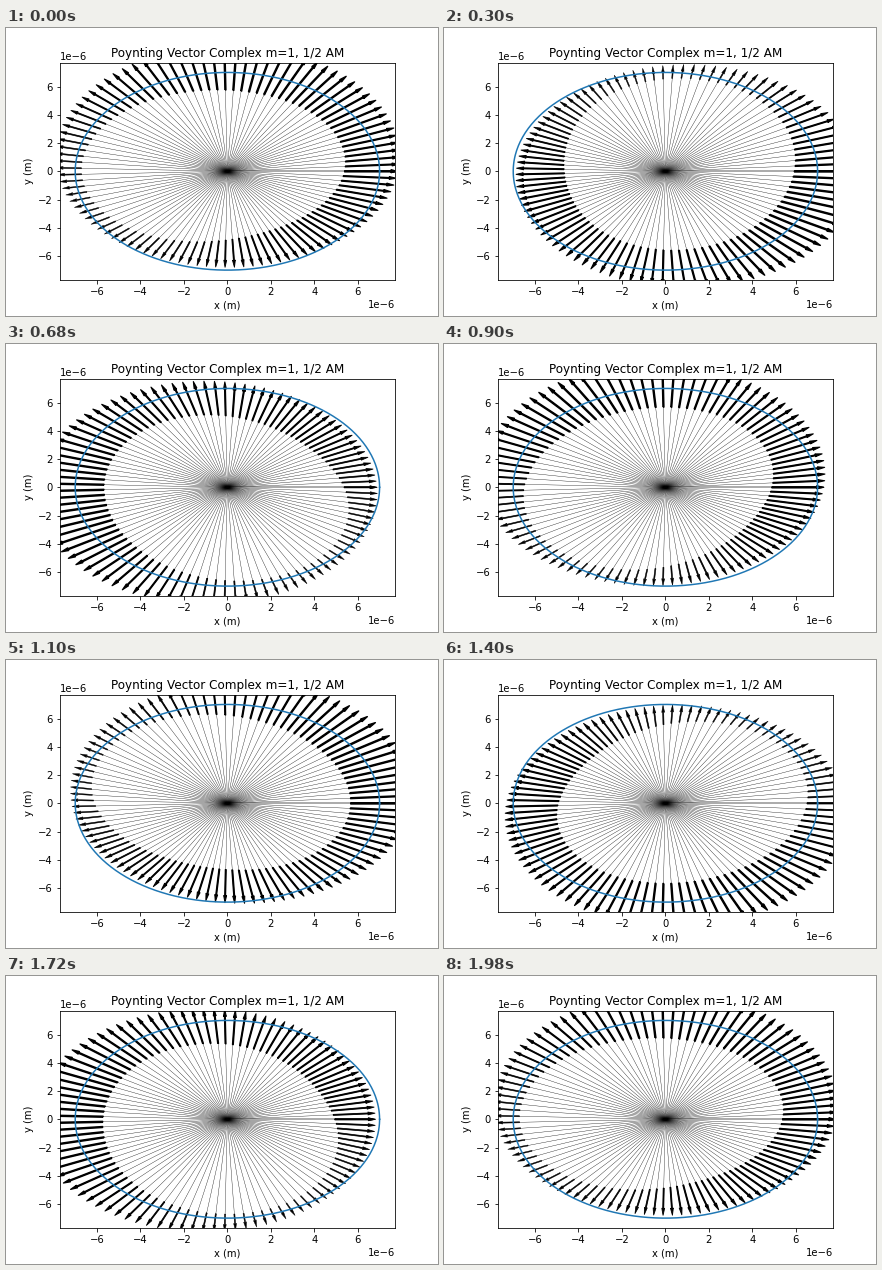
These frames come from a looping animation (432x288 px, 2 s). A matplotlib script:

```python
import matplotlib.pyplot as plt
import numpy as np
from matplotlib.animation import FuncAnimation
from matplotlib.collections import LineCollection
from matplotlib.ticker import MultipleLocator

FRAMES = 100
TURNS = 2
UNIT = 1e-6
RADIUS = 7 * UNIT
LIMIT = 7.7 * UNIT

plt.rcParams["font.family"] = "DejaVu Sans"
plt.rcParams["font.size"] = 10

theta = np.linspace(0, 2 * np.pi, 100)
rays = np.column_stack([np.cos(theta), np.sin(theta)])


def wave(frame):
    """Radius of arrow tails and tips at every angle, in units."""
    u = theta + 2 * np.pi * TURNS * frame / (FRAMES - 1)
    v = u - np.radians(236)
    tail = 5.68 - 0.8 * (np.sin(v) + np.sin(2 * v) / 2)
    tip = 7.85 + 1.05 * np.sin(u)
    return tail, tip


def geometry(frame):
    tail, tip = wave(frame)
    length = tip - tail
    tails = rays * tail[:, None] * UNIT
    vectors = rays * length[:, None] * UNIT
    return tails, vectors, 0.45 * length


fig, ax = plt.subplots(figsize=(6, 4), dpi=72)
fig.subplots_adjust(left=0.125, right=0.9, bottom=0.125, top=0.88)

circle = np.linspace(0, 2 * np.pi, 400)
ax.plot(RADIUS * np.cos(circle), RADIUS * np.sin(circle), color="C0", lw=1.5)

tails, vectors, weights = geometry(0)
spokes = LineCollection([], colors="black", linewidths=0.35, zorder=1)
ax.add_collection(spokes, autolim=False)
arrows = ax.quiver(*tails.T, *vectors.T, angles="xy", scale_units="xy",
                   scale=1, width=0.003, headwidth=2.8, headlength=7,
                   headaxislength=6.5, facecolor="black", edgecolor="black",
                   linewidths=weights, zorder=1)

ax.set(xlim=(-LIMIT, LIMIT), ylim=(-LIMIT, LIMIT),
       xlabel="x (m)", ylabel="y (m)",
       title="Poynting Vector Complex m=1, 1/2 AM")
ax.xaxis.set_major_locator(MultipleLocator(2 * UNIT))
ax.yaxis.set_major_locator(MultipleLocator(2 * UNIT))


def update(frame):
    tails, vectors, weights = geometry(frame)
    spokes.set_segments(np.stack([np.zeros_like(tails), tails], axis=1))
    arrows.set_offsets(tails)
    arrows.set_UVC(*vectors.T)
    arrows.set_linewidths(weights)
    return spokes, arrows


anim = FuncAnimation(fig, update, frames=FRAMES, interval=20,
                     repeat=True, repeat_delay=0)
plt.show()
```
